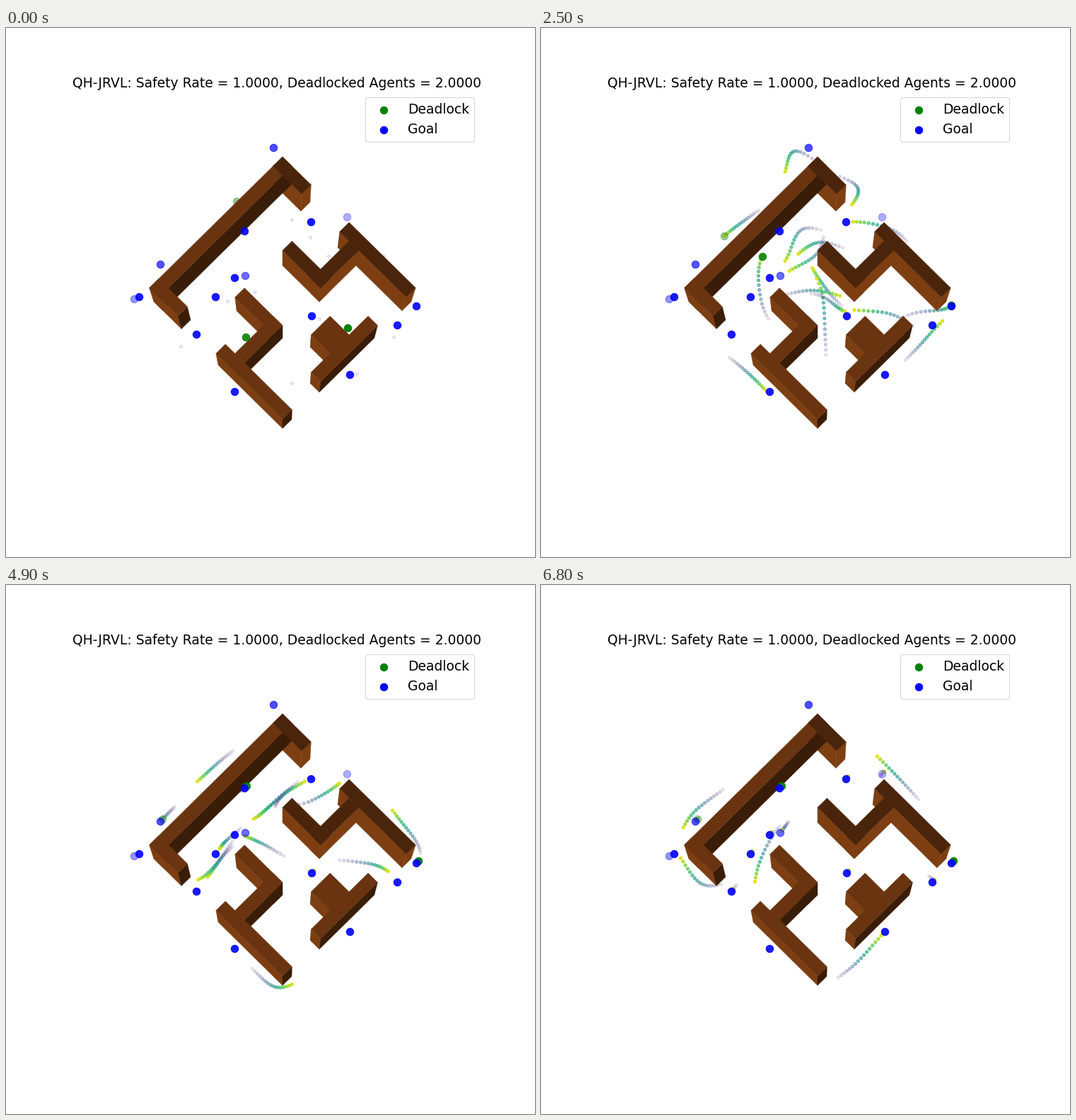
A matplotlib script for the animation above (6900 ms loop, 748x748 px).

```python
import numpy as np
import matplotlib.pyplot as plt
from matplotlib.animation import FuncAnimation
from matplotlib.patches import Polygon

FRAMES, TAIL, SIZE = 69, 16, 748
DOT, BALL = 16, 100
LIGHT, MID, DARK, DEEP = "#7d3e11", "#6a3410", "#3a1d08", "#4b250b"
APEX = np.array([391, 182])        # lattice corner nearest the title
CELL = np.array([13.45, 13.25])
VANISH, SHRINK = np.array([391, 944]), 0.966
RAMP = 9                           # frames spent speeding up
LIFT = np.array([3, -3])           # agents hover beside their goal

fig = plt.figure(figsize=(10, 10), dpi=74.8, facecolor="white")
frame_ax = fig.add_subplot()
frame_ax.axis("off")
frame_ax.set_title(
    "QH-JRVL: Safety Rate = 1.0000, Deadlocked Agents = 2.0000", fontsize=18)
for color, label in (("green", "Deadlock"), ("blue", "Goal")):
    frame_ax.scatter([], [], s=BALL, color=color, label=label)
frame_ax.legend(loc="upper right", fontsize=18, bbox_to_anchor=(0.9975, 1.0015))

ax = fig.add_axes([0, 0, 1, 1])
ax.set_xlim(0, SIZE)
ax.set_ylim(SIZE, 0)
ax.axis("off")


def top(i, j):
    """Lattice point on the upper plane: i runs right-down, j left-down."""
    return APEX + CELL * (i - j, i + j)


def face(corners, color, z):
    ax.add_patch(Polygon(corners, fc=color, ec=color, lw=0.3, zorder=z))


def box(i0, i1, j0, j1, shaded=False):
    a, b, c, d = top(i0, j0), top(i1, j0), top(i1, j1), top(i0, j1)
    for p, q, color in ((d, c, LIGHT), (b, c, LIGHT if shaded else DARK)):
        base = [VANISH + SHRINK * (v - VANISH) for v in (q, p)]
        face([p, q, *base], color, 3)
    face([a, b, c, d], DEEP if shaded else MID, 3.2 if shaded else 3.1)


# corner wall
box(0, 3, 0, 1, shaded=True)
box(0, 1, 0, 14)
box(0, 3, 13, 14)
# hooked wall
box(7, 14, 0, 1, shaded=True)
box(5, 9, 4, 5, shaded=True)
box(8, 9, 1, 5, shaded=True)
# zigzag wall
box(5, 9, 9, 10)
box(8, 9, 9, 13)
box(7, 14, 13, 14)
# T-shaped wall
box(11, 13, 6, 8)
box(13, 14, 4, 10)


def glide(t):
    """Distance at unit speed after a steady start from rest."""
    return np.where(t < RAMP, t**2 / (2 * RAMP), t - RAMP / 2)


def curve(pts, u):
    """Smooth curve through pts; whole values of u hit the points."""
    slope = np.gradient(pts, axis=0)
    i = np.minimum(u.astype(int), len(pts) - 2)
    f = (u - i)[:, None]
    g = 1 - f
    return (g**2 * ((1 + 2 * f) * pts[i] + f * slope[i])
            + f**2 * ((1 + 2 * g) * pts[i + 1] - g * slope[i + 1]))


class Agent:
    """Glides from start past the via points to its goal by a given frame."""

    def __init__(self, goal, arrive, *route, fade=0.9, stuck=0, z=1):
        pts = np.array([*route, goal + LIFT], float)
        done = np.clip(glide(np.arange(FRAMES)) / glide(arrive), 0, 1)
        self.path = curve(pts, done * (len(pts) - 1))
        ax.scatter(*goal, s=BALL, color=[(0, 0, 1, fade)], zorder=5)
        self.dots = ax.scatter([], [], s=DOT, zorder=z)
        self.ball = ax.scatter([], [], s=BALL, color=[(0, 0.5, 0, stuck)],
                               zorder=z + 0.5, visible=stuck > 0)

    def show(self, t):
        trail = self.path[max(0, t - TAIL + 1):t + 1]
        n = len(trail)
        rgba = plt.cm.viridis(np.linspace(0, 0.95, n))
        rgba[:, 3] = np.linspace(0.1, 1, n)
        self.dots.set_offsets(trail)
        self.dots.set_color(rgba)
        self.ball.set_offsets(trail[-1:])


agents = [
    # deadlocked
    Agent((218, 334), 42, (326, 245), (264, 290), fade=0.68, stuck=0.4),
    Agent((337, 287), 39, (339, 437), (314, 395), (308, 340), (325, 300),
          stuck=0.88, z=4),
    Agent((580, 393), 27, (483, 424), (525, 404), (568, 398), stuck=0.98),
    # through the middle to the lower left
    Agent((269, 433), 55, (430, 296), (371, 284), (346, 328), (318, 366),
          (294, 401)),
    Agent((296, 380), 52, (456, 322), (395, 303), (353, 328), (313, 360)),
    Agent((188, 380), 70, (404, 271), (391, 318), (346, 347), (310, 380),
          (275, 415), (228, 423)),
    Agent((338, 350), 60, (378, 195), (445, 222), (436, 255), (398, 291),
          (358, 326), fade=0.58),
    Agent((323, 514), 85, (534, 322), (500, 287), (443, 274), (403, 287),
          (365, 320), (332, 348), (306, 402), (303, 458)),
    Agent((323, 353), 53, (548, 437), (496, 405), (420, 395), (363, 366)),
    # up through the gap
    Agent((431, 274), 52, (443, 411), (405, 371), (380, 329), (390, 299)),
    Agent((482, 267), 56, (404, 502), (402, 440), (398, 377), (383, 325),
          (432, 305), (467, 284), fade=0.32),
    # around the outside
    Agent((181, 383), 76, (430, 220), (361, 174), (339, 217), (298, 253),
          (260, 287), (212, 326), fade=0.42),
    Agent((486, 490), 70, (247, 450), (294, 489), (337, 531), (384, 569),
          (436, 543)),
    Agent((378, 169), 90, (496, 489), (545, 438), (586, 383), (552, 326),
          (502, 269), (442, 212), fade=0.7),
    # left to right
    Agent((432, 407), 28, (352, 373), (394, 378), (421, 396)),
    Agent((553, 420), 56, (313, 386), (383, 371), (450, 386), (522, 396)),
]


def update(t):
    for agent in agents:
        agent.show(t)


anim = FuncAnimation(fig, update, frames=FRAMES, init_func=lambda: update(0),
                     interval=100, repeat=True, repeat_delay=0)
plt.show()
```
